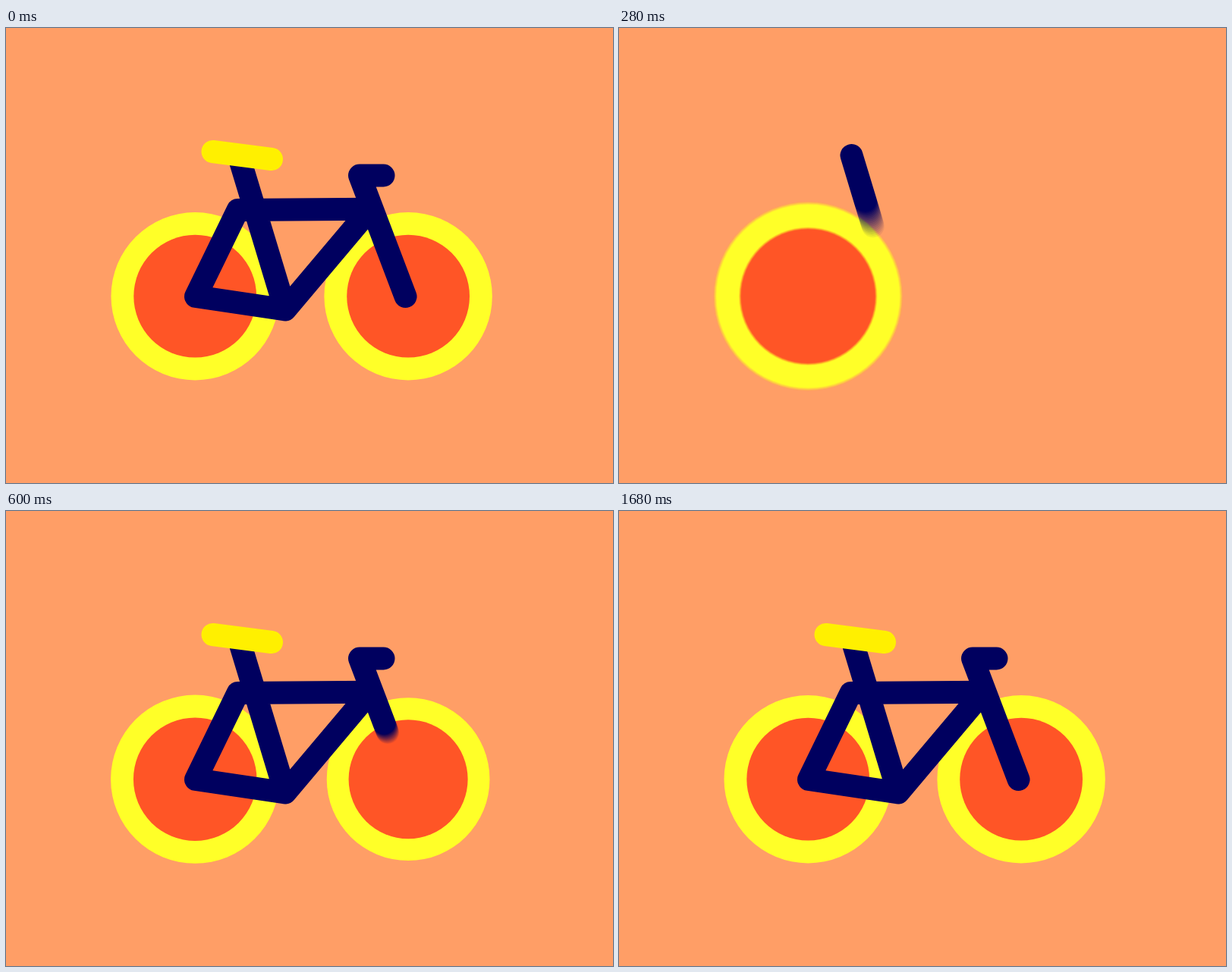
An HTML page with a canvas that plays this animation: 800 px wide and 600 px high, repeating every 1720 ms.

```html
<!DOCTYPE html>
<html lang="en">
<head>
<meta charset="utf-8">
<title>Bicycle</title>
<style>
  html, body { margin: 0; width: 100%; height: 100%; overflow: hidden; background: #ff9e66; }
  canvas { display: block; width: 800px; height: 600px; }
</style>
</head>
<body>
<canvas id="stage" width="800" height="600"></canvas>
<script>
const W = 800, H = 600;
const STEP = 40, FRAMES = 43;      // ms per picture, pictures per loop
const SHUTTER = 20, SAMPLES = 16;  // motion blur
const SETTLED = 900;
const BG = '#ff9e66', NAVY = '#00005f', RIM = '#ffff28', DISC = '#ff5526', SEAT = '#fff000';

const stage = document.getElementById('stage').getContext('2d');
const layer = document.createElement('canvas');
layer.width = W;
layer.height = H;
const ctx = layer.getContext('2d');

const wheels = [
  { x: 249.2, y: 353.7, start: 100 },
  { x: 530.1, y: 353.7, start: 300 }
];

const tubes = [
  { color: NAVY, start: 212, time: 400,
    pts: [[306.5, 168], [368, 371.5], [250, 354], [305.5, 240], [480, 238.7], [368, 371.5]] },
  { color: NAVY, start: 372, time: 400,
    pts: [[497.5, 194.5], [466, 194.5], [526.5, 354]] },
  { color: SEAT, start: 426, time: 170,
    pts: [[350, 173], [272.5, 163]] }
];

for (const tube of tubes) {
  tube.length = tube.pts.slice(1).reduce((sum, [x, y], i) =>
    sum + Math.hypot(x - tube.pts[i][0], y - tube.pts[i][1]), 0);
}

const smooth = p => p * p * (3 - 2 * p);

// Damped spring that settles at 1; s in seconds
const spring = s => 1 - Math.exp(-10.5 * s) * Math.cos(17.95 * s);

function disc(x, y, r, color) {
  ctx.fillStyle = color;
  ctx.beginPath();
  ctx.arc(x, y, r, 0, 2 * Math.PI);
  ctx.fill();
}

function drawWheel({ x, y, start }, t) {
  if (t < start) return;
  const k = spring((t - start + 11.5) / 1000);
  disc(x, y, 110.7 * k, RIM);
  disc(x, y, 80.9 * k, DISC);
}

function drawTube({ pts, color, start, time, length }, t) {
  if (t < start) return;
  const p = Math.min(1, (t - start) / time);
  ctx.setLineDash(p < 1 ? [Math.max(0.01, length * smooth(p)), 2000] : []);
  ctx.strokeStyle = color;
  ctx.beginPath();
  pts.forEach(([x, y]) => ctx.lineTo(x, y));
  ctx.stroke();
}

function drawScene(t) {
  ctx.fillStyle = BG;
  ctx.fillRect(0, 0, W, H);
  ctx.lineWidth = 30;
  ctx.lineCap = ctx.lineJoin = 'round';
  wheels.forEach(w => drawWheel(w, t));
  tubes.forEach(b => drawTube(b, t));
}

// Average several moments while the shutter is open
function expose(t) {
  const n = t > SETTLED ? 1 : SAMPLES;
  for (let i = 0; i < n; i++) {
    drawScene(t + SHUTTER * i / n);
    stage.globalAlpha = 1 / (i + 1);
    stage.drawImage(layer, 0, 0);
  }
}

let shown = -1;
function tick() {
  const frame = Math.floor(performance.now() / STEP) % FRAMES;
  if (frame !== shown) {
    shown = frame;
    expose((frame || FRAMES) * STEP);  // the loop opens on the finished bicycle
  }
  requestAnimationFrame(tick);
}
tick();
</script>
</body>
</html>
```
